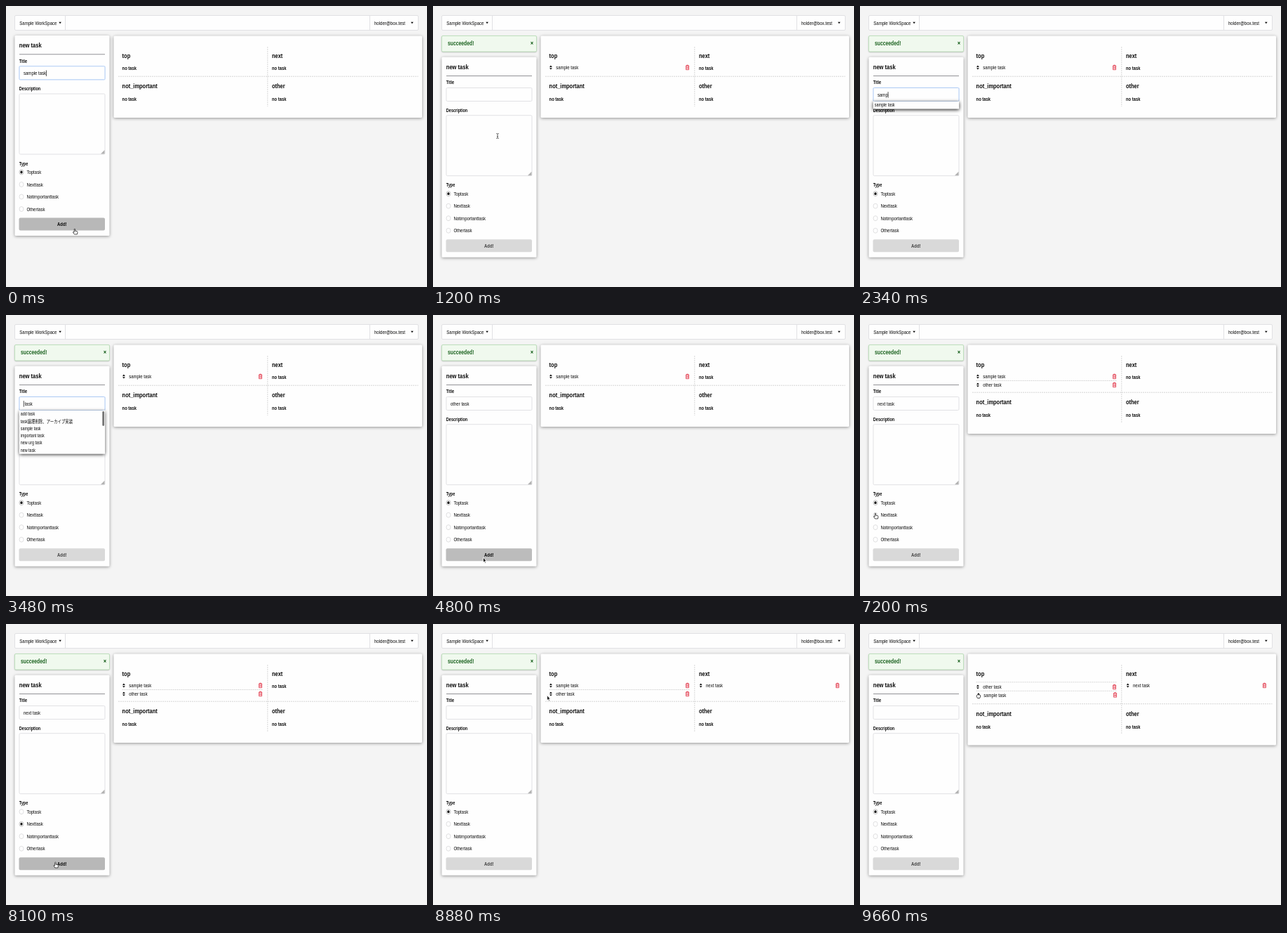
An HTML page with a canvas for the animation above (9720 ms loop, 600x400 px).

```html
<!DOCTYPE html>
<html lang="en">
<head>
<meta charset="utf-8">
<title>Task board</title>
<style>
html, body { margin: 0; width: 100%; height: 100%; overflow: hidden; background: #f4f4f4; }
canvas { display: block; width: 600px; height: 400px; }
</style>
</head>
<body>
<canvas id="stage"></canvas>
<script>
const LOOP = 9720;
const SQUASH = 0.82; // the whole page is shown slightly narrowed
const INK = '#0a0a0a', PAPER = '#fefefe', RULE = '#e1e1e4', PAGE = '#f4f4f4';
const GREEN = '#1c6320', RED = '#e02c40';
const FONT = '"Liberation Sans", "Noto Sans CJK JP", sans-serif';
const ADDED_FIRST = 420, ADDED_SECOND = 5100, ADDED_THIRD = 8460;
const DRAG_START = 9000;

const canvas = document.getElementById('stage');
const ctx = canvas.getContext('2d');
const density = window.devicePixelRatio || 1;
canvas.width = 600 * density;
canvas.height = 400 * density;

const clamp = v => Math.max(0, Math.min(1, v));
const ease = v => v * v * (3 - 2 * v);
const within = (t, from, to) => t >= from && t < to;

function text(str, x, y, size = 7.35, { bold = false, color = INK, align = 'left' } = {}) {
  ctx.save();
  ctx.translate(x, y);
  ctx.scale(SQUASH, 1);
  ctx.font = `${bold ? 'bold ' : ''}${size}px ${FONT}`;
  ctx.textAlign = align;
  ctx.fillStyle = color;
  ctx.fillText(str, 0, 0);
  ctx.restore();
}

function box(x, y, w, h, { fill = PAPER, stroke, radius = 1.5, shadow = 0, shade = 0.4 } = {}) {
  ctx.save();
  ctx.beginPath();
  ctx.roundRect(x, y, w, h, radius);
  if (shadow) {
    ctx.shadowColor = `rgba(0,0,0,${shade})`;
    ctx.shadowBlur = shadow * density;
    ctx.shadowOffsetY = shadow / 4 * density;
  }
  ctx.fillStyle = fill;
  ctx.fill();
  ctx.shadowColor = 'transparent';
  if (stroke) {
    ctx.strokeStyle = stroke;
    ctx.lineWidth = 1;
    ctx.stroke();
  }
  ctx.restore();
}

function line(x1, y1, x2, y2, color = RULE, dash = [], width = 1) {
  ctx.save();
  ctx.beginPath();
  ctx.moveTo(x1, y1);
  ctx.lineTo(x2, y2);
  ctx.setLineDash(dash);
  ctx.strokeStyle = color;
  ctx.lineWidth = width;
  ctx.stroke();
  ctx.restore();
}

function shape(path, x, y, fill, stroke, width = 0.8) {
  ctx.save();
  ctx.translate(x, y);
  const p = new Path2D(path);
  if (fill) { ctx.fillStyle = fill; ctx.fill(p); }
  if (stroke) { ctx.strokeStyle = stroke; ctx.lineWidth = width; ctx.stroke(p); }
  ctx.restore();
}

// Mouse path: time, x, y, pointer kind from that time on
const mouse = [
  [0, 98, 319, 'hand'], [480, 98, 319, 'arrow'], [900, 92, 185, 'ibeam'],
  [1260, 92, 185, 'ibeam'], [1500, 62, 127, 'ibeam'], [2160, 62, 127, 'none'],
  [4140, 62, 127, 'ibeam'], [4320, 70, 230, 'arrow'], [4620, 71.5, 345, 'arrow'],
  [4860, 71.5, 345, 'hand'], [5160, 71.5, 345, 'arrow'], [5400, 62, 127, 'ibeam'],
  [5640, 62, 127, 'none'], [6840, 62, 127, 'arrow'], [7200, 22, 284, 'hand'],
  [7380, 22, 284, 'arrow'], [7740, 70.5, 341, 'hand'], [8520, 70.5, 341, 'arrow'],
  [8940, 168, 87.5, 'grab'], [DRAG_START, 168, 87.5, 'grab'],
  [9480, 169, 102, 'grab'], [LOOP, 169, 102, 'grab']
];

function mouseAt(t) {
  const i = mouse.findIndex(key => key[0] > t) - 1;
  const [t1, x1, y1, kind] = mouse[i];
  const [t2, x2, y2] = mouse[i + 1];
  const k = ease(clamp((t - t1) / (t2 - t1)));
  return { x: x1 + (x2 - x1) * k, y: y1 + (y2 - y1) * k, kind };
}

function drawMouse({ x, y, kind }) {
  if (kind === 'arrow') shape('M0 0V7.2L1.6 5.8 2.7 8.2 3.8 7.7 2.8 5.3H4.7Z', x, y, '#111', '#fff');
  if (kind === 'hand') shape('M-.8-1.4Q0-2.4.6-1.4V1.2L3.4 1.9Q4.2 2.2 4 3.2L3.4 6H-.6L-2.6 3Q-2.6 1.8-.8 3Z', x, y, '#fff', '#222');
  if (kind === 'ibeam') shape('M-1.8-3.5Q0-3.5 0-2.5Q0-3.5 1.8-3.5M0-2.5V2.5M-1.8 3.5Q0 3.5 0 2.5Q0 3.5 1.8 3.5M-1 .8H1', x, y, null, '#444');
  if (kind === 'grab') shape('M-2.4-.6Q-1.6-2-.8-1Q0-2.2.8-1Q1.8-2 2.5-.2V1.6L1.6 3.6H-1.4L-2.8 1.4Z', x, y, '#fff', '#111');
}

function titleAt(t) {
  const typed = (word, start, step) => word.slice(0, Math.max(0, Math.floor((t - start) / step) + 1));
  if (t < ADDED_FIRST) return 'sample task';
  if (t < 2640) return typed('samp', 2160, 60);
  if (t < 3000) return 'sample task';
  if (t < 3540) return 'sample'.slice(0, Math.max(0, 5 - Math.floor((t - 3000) / 80))) + ' task';
  if (t < ADDED_SECOND) return typed('other', 3540, 100) + ' task';
  if (t < ADDED_THIRD) return typed('next task', 5640, 140);
  return '';
}

const history = ['add task', 'task論理削除、アーカイブ実装', 'sample task', 'important task',
  'new urg task', 'new task', 'next', 'nex'];

function drawSuggestions(title) {
  const rows = history.filter(s => title[0] === ' ' ? s.includes('task') : s.startsWith(title));
  if (!rows.length) return;
  box(18.8, 135.8, 122.4, rows.length * 10.25 + 0.5, { shadow: 5, shade: 0.9, radius: 0 });
  rows.forEach((row, i) => text(row, 20.7, 143.3 + i * 10.25, 6.6));
  if (rows.length > 5) box(137.3, 137, 2.8, 21, { fill: '#747474' });
}

function drawNav() {
  box(12.5, 13.5, 575, 21, { stroke: RULE });
  line(84.5, 14, 84.5, 34);
  line(518.5, 14, 518.5, 34);
  text('Sample WorkSpace', 19.3, 26.6);
  text('holder@box.test', 525, 26.6);
  for (const x of [77.1, 578.8]) shape('M-1.8-1.2H1.8L0 1.3Z', x, 24, INK);
}

function drawAlert() {
  box(12.5, 42.5, 135, 22.5, { fill: '#f0f9ee', stroke: '#bfe0bd', shadow: 2 });
  text('succeeded!', 21, 56.2, 8.3, { bold: true, color: GREEN });
  shape('M-1.5-1.7L1.5 1.7M1.5-1.7L-1.5 1.7', 141, 52.8, null, GREEN, 1.1);
}

function drawForm(t, pointer) {
  const hasAlert = t >= ADDED_FIRST;
  const focused = t < ADDED_FIRST || within(t, 1500, 4700) || within(t, 5400, 7200);
  const title = titleAt(t);
  const label = (str, y) => text(str, 18.8, y, 6.75, { bold: true });
  const offset = hasAlert ? 30.7 : 0;
  if (hasAlert) drawAlert();

  ctx.save();
  ctx.translate(0, offset);
  box(12.5, 42, 135, 285, { shadow: 4 });
  text('new task', 18.8, 59.2, 9.2, { bold: true });
  line(19, 68.8, 141, 68.8, '#929296');
  label('Title', 80.6);
  if (focused) box(18, 84.8, 124, 21, { fill: '#e9f2ff', radius: 2 });
  box(19, 85.8, 122, 19, { stroke: focused ? '#b2cdf4' : RULE });
  text(title, 25, 97.9);
  if (focused && Math.floor(t / 500) % 2 === 0) {
    ctx.font = `7.35px ${FONT}`;
    const beforeCaret = within(t, 3000, 4100) ? title.slice(0, -5) : title;
    const caretX = 25.3 + ctx.measureText(beforeCaret).width * SQUASH;
    line(caretX, 91.5, caretX, 100, INK, [], 0.7);
  }

  label('Description', 120);
  box(19, 125, 122, 86, { stroke: RULE });
  shape('M135 210.5L140.5 205V210.5Z', 0, 0, '#b2b2b2');
  label('Type', 226.6);
  const selected = within(t, 7260, ADDED_THIRD) ? 1 : 0;
  ['Toptask', 'Nexttask', 'Notimportanttask', 'Othertask'].forEach((name, i) => {
    const y = 236.5 + i * 17.5;
    ctx.beginPath();
    ctx.ellipse(22, y, 3, 3.5, 0, 0, Math.PI * 2);
    ctx.fillStyle = PAPER;
    ctx.fill();
    ctx.strokeStyle = i === selected ? '#b4b4b4' : '#d8d8da';
    ctx.lineWidth = 0.8;
    ctx.stroke();
    if (i === selected) {
      ctx.beginPath();
      ctx.ellipse(22, y, 1.6, 1.9, 0, 0, Math.PI * 2);
      ctx.fillStyle = INK;
      ctx.fill();
    }
    text(name, 29.4, y + 2.7);
  });

  const hover = pointer.kind !== 'none' && within(pointer.x, 19, 141) &&
    within(pointer.y - offset, 301, 320.5);
  const fill = !hover ? '#d9d9d9' : pointer.kind === 'hand' ? '#b8b8b8' : '#bcbcbc';
  box(18.5, 301.5, 122.5, 18, { fill, radius: 2 });
  text('Add!', 79.8, 313.2, 7.2, { bold: true, align: 'center', color: hover ? INK : '#444' });
  ctx.restore();

  if (within(t, 2160, 2640) || within(t, 3400, 3540) || within(t, 5640, 6200)) {
    drawSuggestions(title);
  }
}

function drawTask(name, x, y) {
  shape('M-1.9-.6L0-3 1.9-.6ZM-1.9.7L0 3 1.9.7Z', x + 2.3, y, INK);
  text(name, x + 9.6, y + 2.6);
  shape('M-2.5-2.3H2.5M-1-2.3V-3.3H1V-2.3M-2-2.3V3.2H2V-2.3M-.7-1V2M.7-1V2', x + 197, y, null, RED);
}

function drawBoard(t, pointer) {
  const dragging = t >= DRAG_START;
  const shift = dragging ? 13.5 : t >= ADDED_SECOND ? 10 : 0;
  const divider = 100.2 + shift;
  const heading = (str, x, y) => text(str, x, y, 9.1, { bold: true });
  const empty = (x, y) => text('no task', x, y, 7.1, { bold: true });
  const dashed = (x1, y1, x2, y2) => line(x1, y1, x2, y2, '#d6d6d6', [2, 1]);

  box(153.5, 42.5, 439.5, 116.5 + shift, { shadow: 4 });
  dashed(372.8, 58, 372.8, 143 + shift);
  dashed(160, divider, 587.5, divider);
  heading('top', 165.6, 73.7);
  heading('next', 379, 73.7);
  heading('not_important', 165.6, 117.2 + shift);
  heading('other', 379, 117.2 + shift);
  empty(165.6, 135 + shift);
  empty(379, 135 + shift);

  if (t < ADDED_FIRST) empty(165.6, 91.3);
  else if (dragging) {
    const swapped = pointer.y > 94;
    dashed(165.5, 82.8, 366, 82.8);
    dashed(165.5, 95.3, 366, 95.3);
    drawTask('other task', 165.6, swapped ? 89.6 : 101.2);
    drawTask('sample task', 165.6 + pointer.x - 168, pointer.y - 1);
  } else {
    drawTask('sample task', 165.6, 87.5);
    if (t >= ADDED_SECOND) {
      dashed(165.5, 93.5, 366, 93.5);
      drawTask('other task', 165.6, 99.5);
    }
  }
  if (t >= ADDED_THIRD) drawTask('next task', 379.4, 87.5);
  else empty(379, 91.3);
}

function draw(now) {
  const t = now % LOOP;
  const pointer = mouseAt(t);
  ctx.setTransform(density, 0, 0, density, 0, 0);
  ctx.fillStyle = PAGE;
  ctx.fillRect(0, 0, 600, 400);
  drawNav();
  drawBoard(t, pointer);
  drawForm(t, pointer);
  drawMouse(pointer);
}

let start;
function tick(now) {
  start ??= now;
  draw(now - start);
  requestAnimationFrame(tick);
}
requestAnimationFrame(tick);
</script>
</body>
</html>
```
